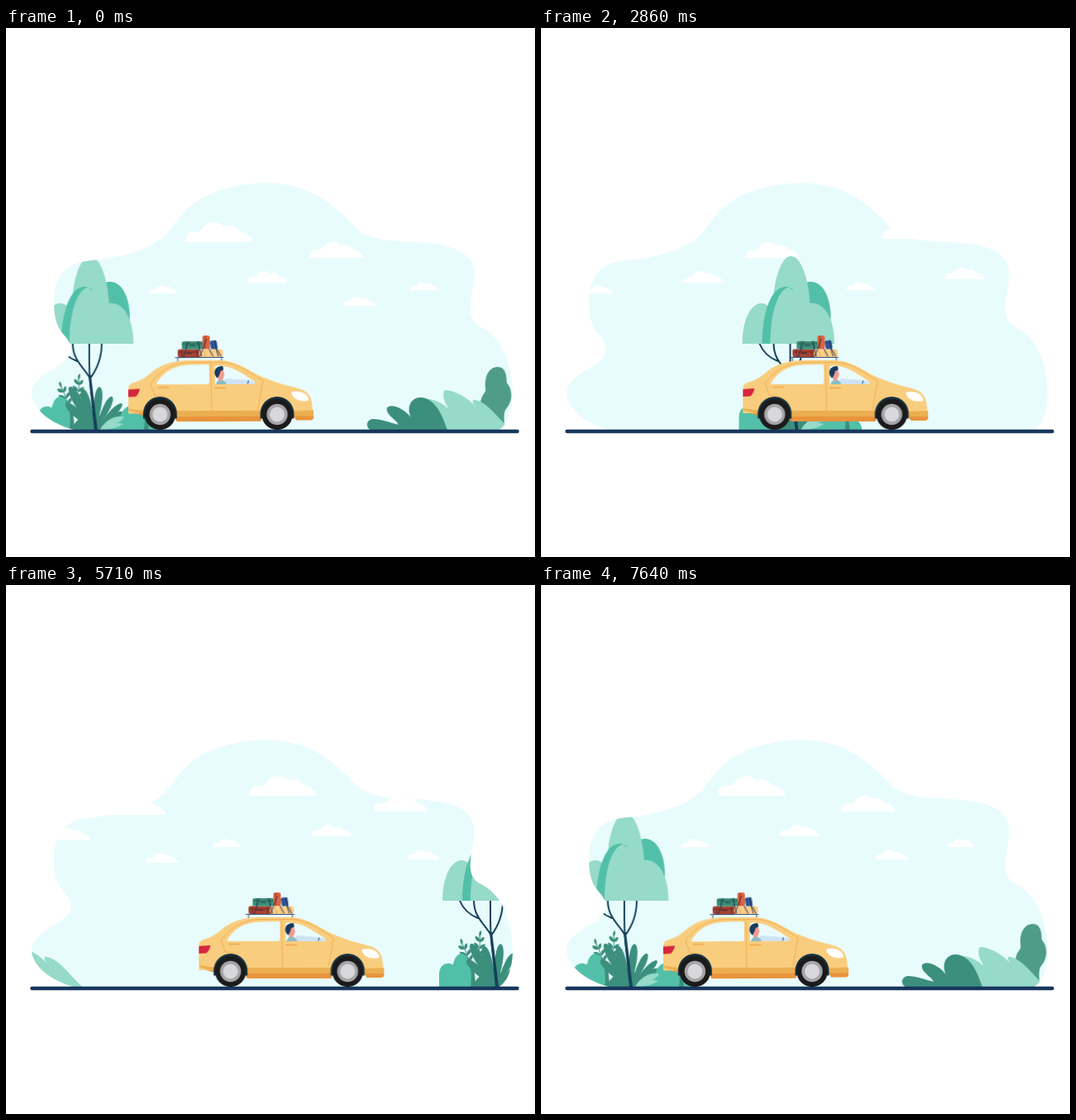
An HTML page that plays this animation: 640 px wide and 640 px high, repeating every 7.71 s.

```html
<!DOCTYPE html>
<html lang="en">
<head>
<meta charset="utf-8">
<title>Road trip</title>
<style>
html, body { margin: 0; width: 100%; height: 100%; overflow: hidden; background: #fff; }
svg { display: block; width: 100%; height: 100%; }

.light { fill: #96dac9; }
.teal { fill: #52c0a8; }
.deep { fill: #3c8f7c; }
.line { fill: none; stroke-linecap: round; stroke-linejoin: round; }
.bark { stroke: #14405a; stroke-width: 2; }
.seam { stroke: #f0b055; stroke-width: 1; }
.strap { stroke: #1c2f4d; stroke-width: .9; }

#clouds, #scenery, #car, #body { animation: 7710ms linear infinite; }
#clouds { animation-name: drift; fill: #fff; }
#scenery { animation-name: pass; }
#car { animation-name: drive; }
#body { animation-name: rock; animation-timing-function: ease-in-out; transform-origin: 257px 462px; }

@keyframes drift { to { transform: translateX(-321.9px); } }

@keyframes pass {
  0% { transform: translateX(0); }
  13.878% { transform: translateX(-272.5px); }
  25.94% { transform: translateX(-506px); }
  48.119% { transform: translateX(-941px); }
  64.851% { transform: translateX(-1265px); }
  83.398% { transform: translateX(-1625px); }
  99.092% { transform: translateX(-1929px); }
  100% { transform: translateX(-1946px); }
}

@keyframes drive {
  0% { transform: translateX(0); }
  13.878% { transform: translateX(35.7px); }
  25.94% { transform: translateX(70.5px); animation-timing-function: cubic-bezier(.33, .45, .67, .79); }
  48.119% { transform: translateX(114px); animation-timing-function: cubic-bezier(.33, .42, .67, .82); }
  64.851% { transform: translateX(132.700px); animation-timing-function: cubic-bezier(.4, .1, .7, .85); }
  83.398% { transform: translateX(22px); animation-timing-function: cubic-bezier(.2, .6, .5, 1); }
  99.092%, 100% { transform: translateX(0); }
}

@keyframes rock {
  0%, 99.092%, 100% { transform: rotate(-.25deg); }
  13.878% { transform: rotate(0); }
  25.94% { transform: rotate(.7deg); }
  48.119% { transform: rotate(-.7deg); }
  64.851% { transform: rotate(.1deg); }
  83.398% { transform: rotate(0); }
}
</style>
</head>
<body>
<svg viewBox="0 0 640 640">
  <defs>
    <path id="sky" d="M82 486C55 479 31 461 31 441C32 424 54 415 66 407C84 394 81 383 69 370C60 360 58 346 58 331C58 303 70 284 101 281.500C145 277 182 267 200 242C215 220 229 208 251 199C273 191 294 187.500 316 187.500C366 188 396 212 423 241C440 259 470 257 502 259.500C545 262 571 273 566 306C563 329 556 349 571 360C587 367 601 381 608 407C612 420 613 436 613 445C612 466 607 479 597 486Z"/>
    <clipPath id="frame"><use href="#sky"/></clipPath>

    <path id="cloud" d="M0 0C0-9 6-14 12-12C17-12 19-14 21-16C25-25 40-27 47-18C52-22 62-20 66-12C72-13 75-10 76-7C80-7 81-4 81 0Z"/>
    <g id="sky-set">
      <use href="#cloud" transform="translate(217 259)"/>
      <use href="#cloud" transform="translate(367 278) scale(.8)"/>
      <use href="#cloud" transform="translate(292 308) scale(.59)"/>
      <use href="#cloud" transform="translate(408 336) scale(.48)"/>
      <use href="#cloud" transform="translate(173 321) scale(.41)"/>
    </g>

    <path id="leaf" d="M0 0C-3-14-7-39-2-48Q0-51 2-48C7-39 3-14 0 0Z"/>
    <g id="twig" class="deep">
      <path class="line" stroke="#3c8f7c" d="M0 0Q0-14-4-27"/>
      <path d="M-4-25Q-7-30-4-33Q-1-29-4-25ZM-2-19Q-9-19-9-25Q-3-25-2-19ZM-2-19Q3-20 2-26Q-3-25-2-19ZM-1-11Q-8-11-9-17Q-2-17-1-11ZM-1-11Q5-12 5-18Q-1-17-1-11ZM0-4Q-7-4-8-10Q-1-10 0-4ZM0-4Q6-5 6-11Q0-10 0-4Z"/>
    </g>

    <g id="tree">
      <use href="#twig" transform="translate(76 459) rotate(-12)"/>
      <use href="#twig" transform="translate(86 451) rotate(13)"/>
      <path class="teal" d="M39 486V470C40 455 55 455 60 464V486Z"/>
      <path class="deep" d="M62 486V448C73 443 83 458 83 486Z"/>
      <path class="teal" d="M54 486C53 462 57 446 66 446C75 447 80 466 77 486Z"/>
      <g class="deep">
        <use href="#leaf" transform="translate(106 486) rotate(-46) scale(1.1 .94)"/>
        <use href="#leaf" transform="translate(106 486) rotate(-29) scale(1.25 1.2)"/>
        <use href="#leaf" transform="translate(107 486) rotate(-16) scale(1.15 1.04)"/>
        <use href="#leaf" transform="translate(108 486) rotate(6) scale(1.1 1.05)"/>
        <use href="#leaf" transform="translate(109 486) rotate(26) scale(.95 .9)"/>
        <use href="#leaf" transform="translate(109 486) rotate(45) scale(.9 .9)"/>
        <use href="#leaf" transform="translate(109 486) rotate(56) scale(.85 .78)"/>
        <path d="M78 486Q92 464 108 462L128 486Z"/>
      </g>
      <path class="teal" d="M164 486V473C176 468 187 475 188 486Z"/>
      <path class="deep" d="M153 458C166 459 173 471 173 486H145Z"/>
      <path class="teal" d="M115 486C121 473 132 469 139 470C142 453 162 453 167 471Q169 478 167 486Z"/>
      <path class="light" d="M114 486C119 476 130 469 143 470C141 475 137 477 134 478Q139 478 142 479Q133 486 114 486Z"/>
      <g class="line bark">
        <path d="M64 382Q70 397 86 403M81 382C81 402 94 410 102 424M116 382Q116 405 102 424"/>
        <path d="M101 382V406Q101 430 106 460"/>
      </g>
      <path fill="#14405a" d="M100 420H103L111 486H107Z"/>
      <path class="light" d="M43 382C43 350 55 333 66 333C79 334 87 350 88 382Z"/>
      <path class="teal" d="M118 382V309C137 300 150 322 150 350V382Z"/>
      <path class="light" d="M80 382V340C80 306 90 276 102 276C115 276 125 309 125 340V382Z"/>
      <path class="teal" d="M67 382C67 345 78 309 99 313.500L104 316V382Z"/>
      <path class="light" d="M77 382C77 347 85 318 99 313.500L124 333C141 331 154.500 349 154.500 382Z"/>
    </g>

    <path id="shrub" fill="#4f9c88" d="M595 410C605 410 606 421 606 429C613 437 614 450 606 460Q602 464 603 476V486H592C591 472 589 465 579 463C572 459 573 449 580 440C581 437 580 435 580 431C580 419 586 410 595 410Z"/>
    <g id="bushes">
      <path class="light" d="M500 486V450C513 446 526 452 536 461C531 453 527 444 531 438C548 439 564 451 574 465C570 459 562 453 566 449.500C583 452 594 471 611 486Z"/>
      <path class="deep" d="M441 486C435 483 436 474 444 473C454 473 464 477 475 480C472 473 460 469 461 460C465 453 482 460 490 471C484 458 491 446 503 447C520 449 528 468 534 486Z"/>
    </g>
    <g id="land"><use href="#bushes"/><use href="#tree"/></g>

    <g id="wheel">
      <path fill="#16303f" d="M-20.500 5V-1A20.500 20.500 0 0 1 20.500-1V5Z"/>
      <circle r="18.700" fill="#1b1b1c"/>
      <circle r="12.700" fill="#a5a5a7"/>
      <circle r="9" fill="#d8d8dc"/>
    </g>
  </defs>

  <use href="#sky" fill="#e9fcfd"/>
  <g id="clouds">
    <use href="#sky-set"/>
    <use href="#sky-set" x="316" y="-4"/>
    <use href="#sky-set" x="637" y="-4"/>
  </g>
  <g clip-path="url(#frame)">
    <g id="scenery">
      <use href="#shrub"/>
      <use href="#land"/>
      <use href="#land" x="925.500"/>
      <use href="#shrub" x="1929"/>
      <use href="#land" x="1929"/>
    </g>
  </g>
  <path class="line" stroke="#17375e" stroke-width="4.500" d="M31.500 488H618.500"/>

  <g id="car">
    <g id="body">
      <!-- luggage -->
      <g transform="translate(0 -1)">
        <rect x="208" y="389.500" width="28" height="9.500" rx="2" fill="#a84332"/>
        <path class="line" stroke="#6e2b28" d="M209 393H235M213 390V399M231 390V399"/>
        <path class="line strap" d="M219 394.500H225"/>
        <rect x="213" y="380" width="26" height="9.500" rx="2" fill="#3c9078"/>
        <path class="line" stroke="#246454" d="M214 383H238M218 380V389M234 380V389"/>
        <path class="line strap" d="M223 385H229"/>
        <rect x="238" y="373" width="9" height="16.500" rx="2.500" fill="#e0633f"/>
        <path class="line" stroke="#8d3b38" d="M241 374V389"/>
        <rect x="247.500" y="379" width="8.500" height="11" rx="2.500" fill="#3865b0" transform="rotate(-8 252 385)"/>
        <path class="line strap" d="M249 380L251 389M253 379L255 388"/>
        <rect x="234" y="389.500" width="29" height="9.500" rx="3.500" fill="#fbd08c"/>
        <path class="line" stroke="#e9a258" d="M239 390L242 399M246 390L249 399M258 390L261 399"/>
        <path class="line strap" d="M221 380L215 399M232 380L237 398M243 377L235 398M246 389L251 398M252 381L257 398M255 389L260 398"/>
        <path class="line" stroke="#35527c" d="M205 399.500H263M208 399.500V404M261 399.500V404"/>
      </g>

      <!-- shell -->
      <path fill="#e8943c" d="M149 459H168V469L152 465ZM205 468H309V475Q309 476 307 476H208Q205 476 205 473ZM347 468H372V472Q372 475 368 475H351Z"/>
      <path fill="#f9cd7e" d="M148 461V437C148 432 150 430 155 428.500C166 426 172 419 182 412C196 403 210 402 229 402H258C277 402 291 413 308 421.500C323 428 340 433 354 436.500C367 440 371 448 371 466H148Z"/>
      <path fill="#ebae50" d="M205 463H309V470H205ZM347 464L372 463V470H350ZM148 460L168 463V467L150 463Z"/>
      <path class="line seam" d="M175 430C184 416 200 405 223 404.500H260C280 405 295 417 311 427L305 461M175 430L180 444Q199 444 206 462M248 405L249 463"/>
      <path class="line" stroke="#eba94a" stroke-width="1.600" d="M185 434.500H197M253 435.500H266"/>
      <path fill="#eafbfd" d="M184 431Q181 431 183 428C193 413 207 408 222 407.500L243 407Q246 407 246 410V428Q246 431 243 431ZM253 431V411Q253 408 257 408.500C276 409 288 420 300 427Q303 431 300 431Z"/>

      <!-- driver -->
      <path fill="#cfe3f7" d="M265 424L292 426L301 428V431H265Z"/>
      <path fill="#8bbdc2" d="M254 431Q255 426 261 425Q266 427 267 431Z"/>
      <path fill="#f39a8f" d="M257 414H263L264.500 419L263 424Q261 425 261 427L257 426Z"/>
      <path fill="#173a5c" d="M262 409Q264 411 263 414Q259 414 259 418L256 424Q250 418 254 412Q257 409 262 409Z"/>
      <path class="line" stroke="#476d98" stroke-width="1.300" d="M293.500 427L292.500 430"/>

      <path fill="#d4263c" d="M148 437L162 436Q161 442 157 445.500L148 446Z"/>
      <path fill="#fff" d="M345 441Q355 438.500 362 443Q367 448 366 451Q362 452.500 354 451Q346 448 345 441Z"/>
    </g>
    <use href="#wheel" x="186.300" y="467.500"/>
    <use href="#wheel" x="328" y="467.500"/>
  </g>
</svg>
</body>
</html>
```
